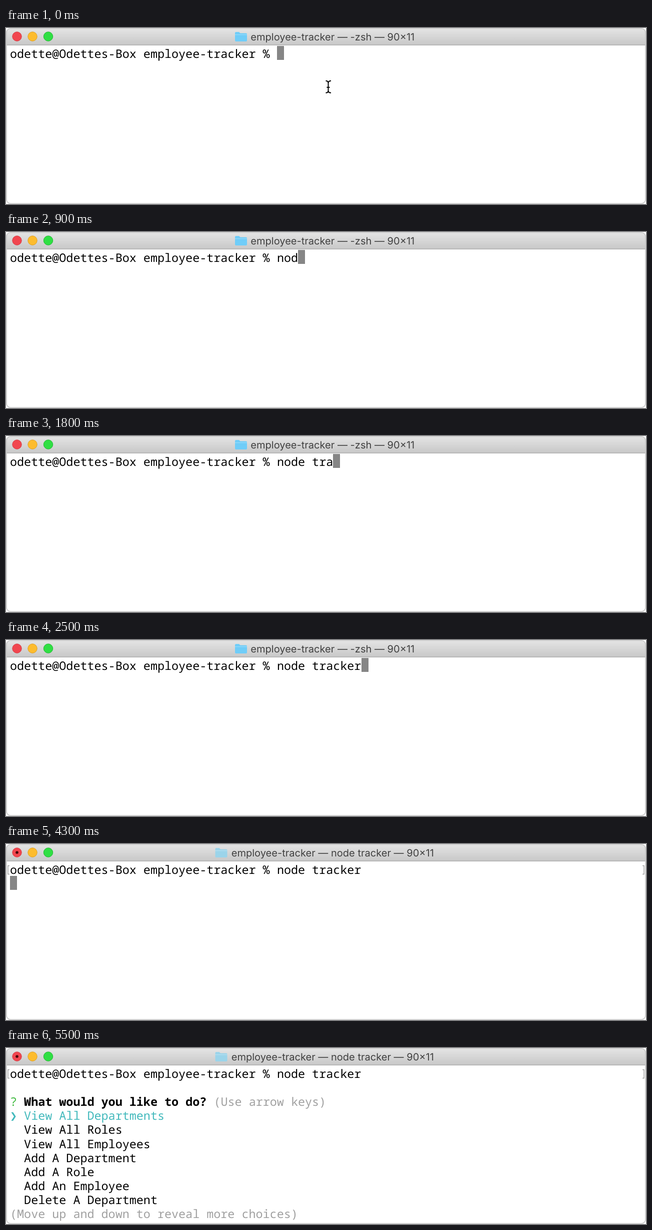
Recreate the animation shown at these times as an HTML page. Size 1280 by 353 pixels, loop 5600 ms.

```html
<!DOCTYPE html>
<html lang="en">
<head>
<meta charset="utf-8">
<title>Terminal</title>
<style>
html, body { margin: 0; width: 100%; height: 100%; overflow: hidden; background: #fff; }
svg { display: block; width: 1280px; height: 353px; }
text { white-space: pre; text-rendering: geometricPrecision; }
.term { font: 500 23.42px "Noto Sans Mono", "DejaVu Sans Mono", monospace; }
.title { font: 20.05px Inter, Roboto, sans-serif; fill: #404040; text-anchor: middle; }
.bold { font-weight: 700; }
</style>
</head>
<body>
<svg viewBox="0 0 1280 353">
  <defs>
    <linearGradient id="bar" x2="0" y2="1">
      <stop stop-color="#e5e5e5"/><stop offset="1" stop-color="#c8c8c8"/>
    </linearGradient>
    <clipPath id="win"><rect x="1" y="1" width="1278" height="351" rx="8"/></clipPath>
  </defs>
  <g clip-path="url(#win)">
    <rect width="1280" height="34" fill="url(#bar)"/>
    <rect y="33.5" width="1280" height="1.3" fill="#a9a9a9"/>
  </g>
  <rect x="1" y="1" width="1278" height="351" rx="8" fill="none" stroke="#c6c6c6" stroke-width="1.6"/>
  <circle cx="22" cy="17" r="9.2" fill="#f1464f" stroke="#d83c45"/>
  <circle cx="53" cy="17" r="9.2" fill="#fdbc2e" stroke="#dfa022"/>
  <circle cx="84.5" cy="17" r="9.2" fill="#30df44" stroke="#22b933"/>
  <circle id="busy" cx="22" cy="17" r="2.8" fill="#450307"/>
  <g id="folder">
    <path d="M0 2q0-2 2-2h6l2.5 2.5H22q2 0 2 2V17q0 2-2 2H2q-2 0-2-2z"/>
    <path d="M0 5.5h24" stroke="#fff" stroke-opacity=".35"/>
  </g>
  <text id="title" class="title" x="653.3" y="25"/>
  <rect id="cursor" width="14" height="28" fill="#868686"/>
  <g id="screen" class="term"></g>
  <path id="marks" d="M7 43.5H4V60.5H7M1273 43.5h3v17h-3" fill="none" stroke="#a0a0a0" stroke-width="1.4"/>
  <g id="menu" class="term"></g>
  <path id="pointer" d="M639.5 106q5 0 5 4.5v15q0 4.5-5 4.5M650 106q-5.5 0-5.5 4.5m0 15q0 4.5 5.5 4.5M641.5 119h6"
    fill="none" stroke="#000" stroke-width="2"/>
</svg>
<script>
const LOOP = 5600, FRAME = 100, TYPE = 325, KEY = 175, ENTER = 3300, MENU = 4400;
const LEFT = 8, COL = 14.05, ROW = 28.1;
const PROMPT = "odette@Odettes-Box employee-tracker % ", COMMAND = "node tracker";
const $ = id => document.getElementById(id);
const show = (id, on) => $(id).setAttribute("visibility", on ? "visible" : "hidden");

function print(parent, row, col, str, color = "#000", cls = "") {
  const el = document.createElementNS("http://www.w3.org/2000/svg", "text");
  el.setAttribute("x", LEFT + col * COL);
  el.setAttribute("y", 60 + row * ROW);
  el.setAttribute("fill", color);
  el.setAttribute("class", cls);
  el.textContent = str;
  return $(parent).appendChild(el);
}

const GREEN = "#3fba3f", CYAN = "#42b9bc", GREY = "#a0a0a0";
print("screen", 0, 0, PROMPT);
const typed = print("screen", 0, PROMPT.length, "");
print("menu", 2, 0, "?", GREEN);
print("menu", 2, 2, "What would you like to do?", "#000", "bold");
print("menu", 2, 29, "(Use arrow keys)", GREY);
print("menu", 3, 0, "❯", CYAN, "bold");
["View All Departments", "View All Roles", "View All Employees", "Add A Department",
 "Add A Role", "Add An Employee", "Delete A Department"]
  .forEach((item, i) => print("menu", 3 + i, 2, item, i ? "#000" : CYAN));
print("menu", 10, 0, "(Move up and down to reveal more choices)", GREY);

function draw(now) {
  const t = Math.floor(now % LOOP / FRAME) * FRAME;
  const count = Math.max(0, Math.min(COMMAND.length, Math.floor((t - TYPE) / KEY)));
  const running = t >= ENTER, menu = t >= MENU;

  typed.textContent = COMMAND.slice(0, count);
  $("cursor").setAttribute("x", running ? LEFT : LEFT + Math.round((PROMPT.length + count) * COL));
  $("cursor").setAttribute("y", running ? 64 : 36);
  $("title").textContent = `employee-tracker — ${running ? COMMAND : "-zsh"} — 90×11`;
  $("folder").setAttribute("transform", `translate(${running ? 418.5 : 458} 8)`);
  $("folder").setAttribute("fill", running ? "#9bd4ea" : "#70cdf8");
  show("cursor", !menu);
  show("pointer", !count);
  show("busy", running);
  show("marks", running);
  show("menu", menu);
}

const start = performance.now();
function tick() {
  draw(performance.now() - start);
  requestAnimationFrame(tick);
}
tick();
</script>
</body>
</html>
```
